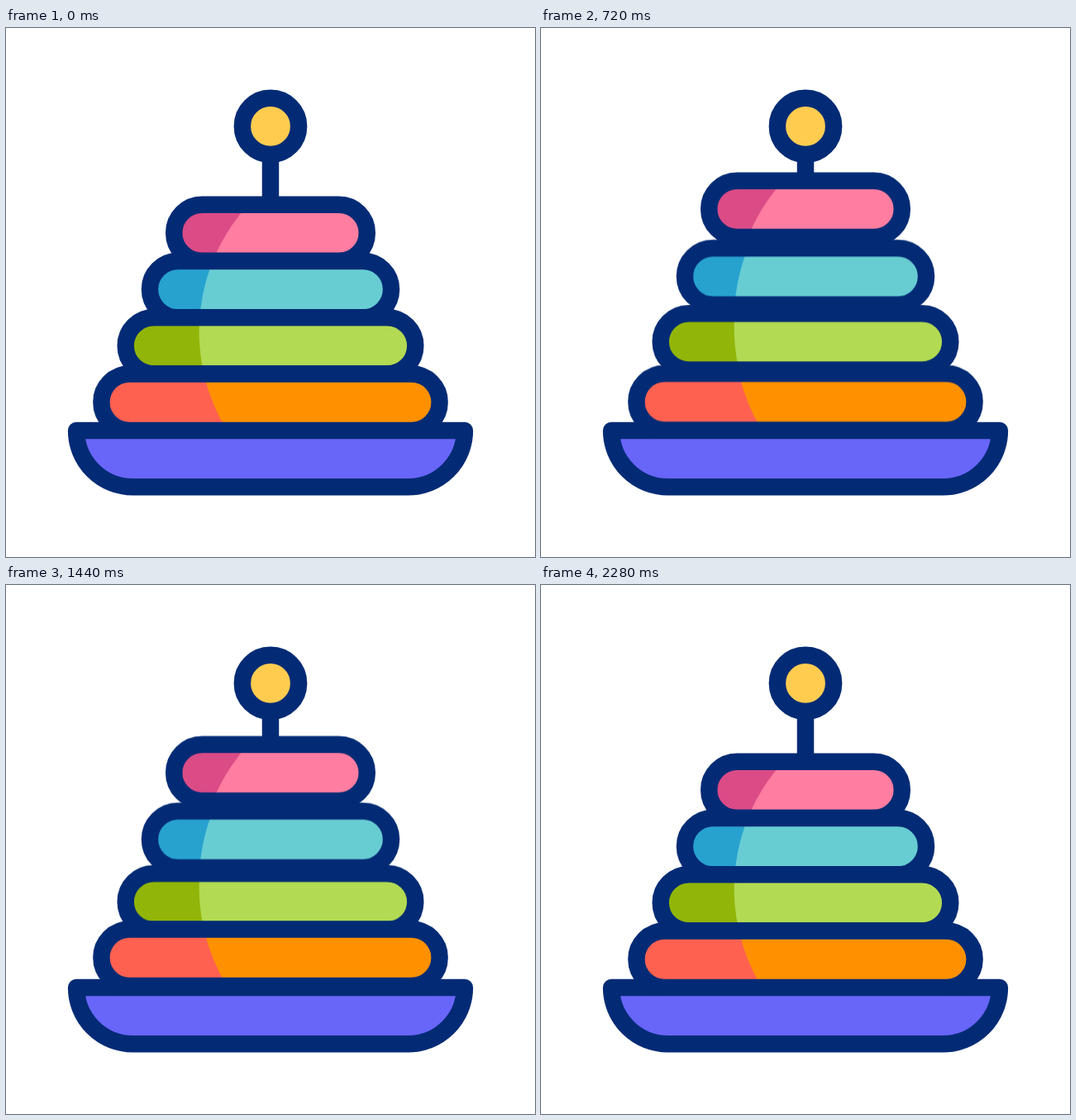
Animation, 640 px wide and 640 px high, one loop 2400 ms. Source, as an HTML page without scripts:

```html
<!DOCTYPE html>
<html lang="en">
<head>
<meta charset="utf-8">
<title>Stacking rings</title>
<style>
  html, body { margin: 0; width: 100%; height: 100%; overflow: hidden; background: #fff; }
  svg { display: block; width: 100vw; height: 100vh; }
  .line { stroke: #032b75; stroke-width: 20.48; stroke-linejoin: round; }
  .ring { animation: bounce 2400ms cubic-bezier(.36, 0, .64, 1) calc(var(--order) * 66.67ms) infinite; }
  @keyframes bounce {
    0%, 86.67%, 100% { transform: translateY(0); }
    15.96%, 44.29%, 72.5% { transform: translateY(-44.5px); }
    30.13%, 58.42% { transform: translateY(-.5px); }
  }
</style>
</head>
<body>
<svg viewBox="0 0 640 640">
  <defs>
    <rect id="r3" x="203.2" y="213.8" width="233.6" height="68.27" rx="34.13"/>
    <rect id="r2" x="173.95" y="282.1" width="292.1" height="68.27" rx="34.13"/>
    <rect id="r1" x="144.7" y="350.3" width="350.6" height="68.27" rx="34.13"/>
    <rect id="r0" x="115.4" y="418.6" width="409.2" height="68.27" rx="34.13"/>
    <clipPath id="c3"><use href="#r3"/></clipPath>
    <clipPath id="c2"><use href="#r2"/></clipPath>
    <clipPath id="c1"><use href="#r1"/></clipPath>
    <clipPath id="c0"><use href="#r0"/></clipPath>
    <!-- One large disc gives every ring its lit side -->
    <circle id="light" cx="462.7" cy="367.5" r="229"/>
  </defs>

  <path class="line" d="M320 150V487"/>
  <circle class="line" cx="320" cy="118.9" r="34.13" fill="#ffcc50"/>
  <path class="line" fill="#6865f9" d="M85.1 487H554.9A68.27 68.27 0 0 1 486.6 555.2H153.4A68.27 68.27 0 0 1 85.1 487Z"/>

  <g class="ring" style="--order: 3">
    <use href="#r3" fill="#db4b86"/>
    <use href="#light" clip-path="url(#c3)" fill="#ff7da0"/>
    <use href="#r3" class="line" fill="none"/>
  </g>
  <g class="ring" style="--order: 2">
    <use href="#r2" fill="#27a2cf"/>
    <use href="#light" clip-path="url(#c2)" fill="#67cdd3"/>
    <use href="#r2" class="line" fill="none"/>
  </g>
  <g class="ring" style="--order: 1">
    <use href="#r1" fill="#91b508"/>
    <use href="#light" clip-path="url(#c1)" fill="#b2da53"/>
    <use href="#r1" class="line" fill="none"/>
  </g>
  <g class="ring" style="--order: 0">
    <use href="#r0" fill="#ff6151"/>
    <use href="#light" clip-path="url(#c0)" fill="#ff9100"/>
    <use href="#r0" class="line" fill="none"/>
  </g>
</svg>
</body>
</html>
```
